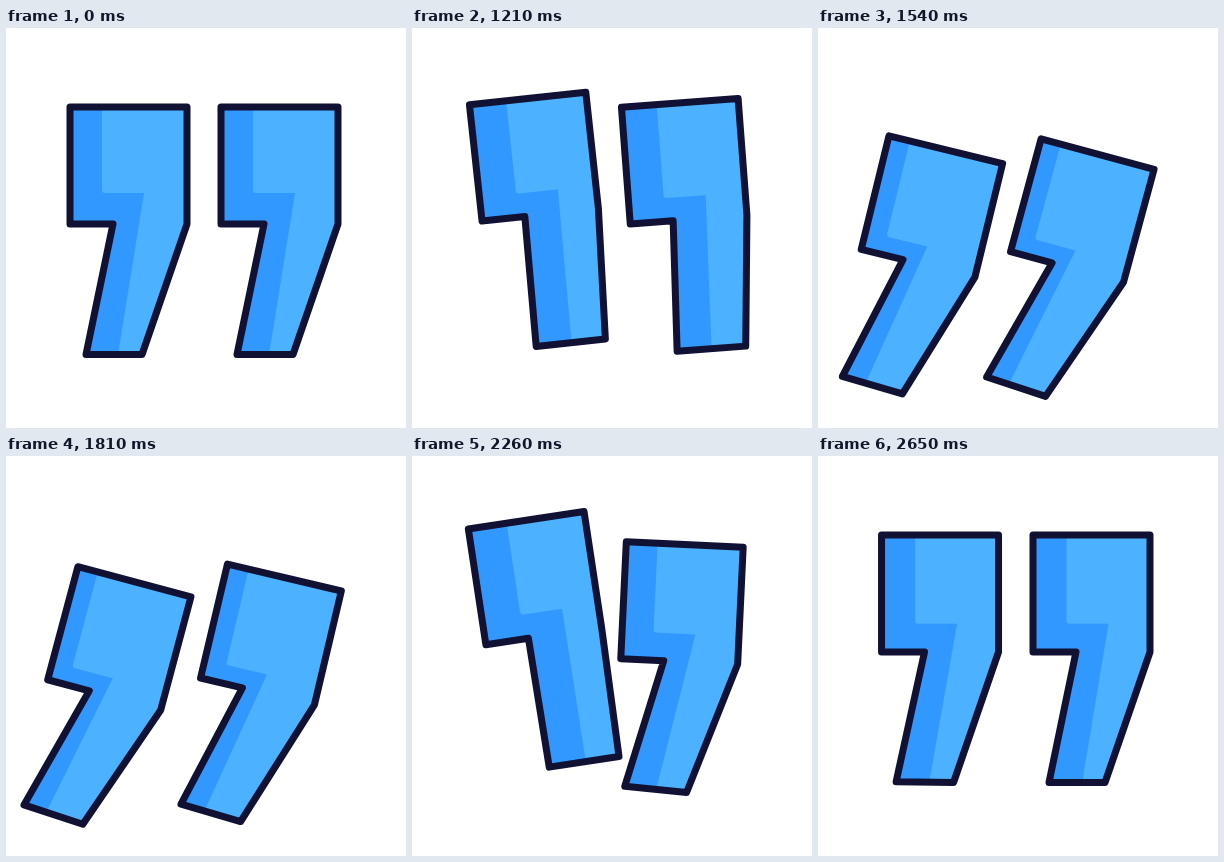
An HTML page that plays this animation: 400 px wide and 400 px high, repeating every 2680 ms.

```html
<!DOCTYPE html>
<html lang="en">
<head>
<meta charset="utf-8">
<title>Quotation marks</title>
<style>
  html, body { margin: 0; width: 100%; height: 100%; overflow: hidden; background: #fff; }
  svg { display: block; width: 100%; height: 100%; }
  .dark { fill: #3198ff; }
  .light { fill: #4cb1ff; }
  .line { fill: none; stroke: #111133; stroke-width: 7; stroke-linejoin: round; }
</style>
</head>
<body>
<svg viewBox="0 0 400 400">
  <g><path class="dark"/><path class="light"/><path class="line"/></g>
  <g><path class="dark"/><path class="light"/><path class="line"/></g>
</svg>
<script>
const LOOP = 2680, START = 1030, STEP = 30, REST = 1000;
const HALF = 58.5, BOTTOM = 189;

// Main poses of the swing: time, angle, drop, tail skew
const KEYS = [
  [REST, 0, 0, -45],
  [1130, -9.5, -17, 0],
  [1300, 6.4, 22, -31.6],
  [1330, 9.9, 30.5, -36.2],
  [1600, 15.5, 46, -46],
  [1810, 13.3, 41, -45],
  [1930, 10.35, 32, -36.9],
  [2050, -2.9, -2.5, -11.7],
  [2115, -9.6, -17.5, 1.5],
  [2260, 2.7, 9.5, -45],
  [2530, 0, 0, -45]
];
const LAST = KEYS.length - 1;

const ramp = (t, from, to) => {
  const u = Math.min(1, Math.max(0, (t - from) / (to - from)));
  return u * u * (3 - 2 * u);
};

const slope = (i, c) => (KEYS[i + 1][c] - KEYS[i][c]) / (KEYS[i + 1][0] - KEYS[i][0]);

// Monotone tangent: flat at turning points, harmonic mean elsewhere
function tangent(i, c) {
  if (i === 0) return slope(0, c);
  if (i === LAST) return 0;
  const a = slope(i - 1, c), b = slope(i, c);
  return a * b <= 0 ? 0 : 2 * a * b / (a + b);
}

function track(t, c) {
  if (t >= KEYS[LAST][0]) return KEYS[LAST][c];
  let i = 0;
  while (t >= KEYS[i + 1][0]) i++;
  const span = KEYS[i + 1][0] - KEYS[i][0];
  const u = (t - KEYS[i][0]) / span, v = 1 - u;
  return v * v * (1 + 2 * u) * KEYS[i][c] + u * u * (3 - 2 * u) * KEYS[i + 1][c]
    + span * u * v * (v * tangent(i, c) - u * tangent(i + 1, c));
}

// The left mark trails the right one more and more
const lag = t => Math.min(120, .1 * Math.max(0, t - START) + .15 * Math.max(0, t - 1330));

function drawMark(group, cx, t) {
  const [dark, light, line] = group.children;
  const [angle, drop, skew] = [1, 2, 3].map(c => track(t, c));
  const awake = ramp(t, REST, 1130), settle = ramp(t, 2140, 2280);
  const loose = awake - ramp(t, 2270, 2650);

  // The tail widens and its inner corner lifts while the mark swings
  const tailR = HALF + skew;
  const tailL = -15.5 + .8 * skew + 3 + 6 * (1 - loose);
  const lift = loose * Math.min(0, .23 * (skew + 31));

  const shadeX = 1.5 * settle - .77 * angle;
  const shadeY = (9 + .25 * angle) * (awake - .7 * settle);
  const edge = -26.5 + shadeX, fold = 27.5 + shadeY;

  const side = `L${HALF} ${-HALF} V${HALF} L${tailR} ${BOTTOM}`;
  const outline = `M${-HALF} ${-HALF} ${side} L${tailL} ${BOTTOM + lift} L-15.5 ${HALF} H${-HALF} Z`;
  dark.setAttribute('d', outline);
  line.setAttribute('d', outline);
  light.setAttribute('d', `M${edge} ${-HALF} ${side} ` +
    `L${tailL + 32 + .75 * shadeX} ${BOTTOM + .6 * lift} ` +
    `L${15.5 + shadeX} ${fold} H${edge + 3} Q${edge} ${fold} ${edge} ${fold - 3} Z`);

  const x = cx - 2 * loose - .16 * drop;
  group.setAttribute('transform', `translate(${x} ${137.5 + drop}) rotate(${angle})`);
}

const [left, right] = document.querySelectorAll('g');

function render(time) {
  const t = time % LOOP;
  const s = t < START ? REST : START + Math.floor((t - START) / STEP) * STEP;
  drawMark(left, 122.5, s - lag(s));
  drawMark(right, 273.5, s);
}

let begin = null;
function tick(now) {
  if (begin === null) begin = now;
  render(now - begin);
  requestAnimationFrame(tick);
}
render(0);
requestAnimationFrame(tick);
</script>
</body>
</html>
```
